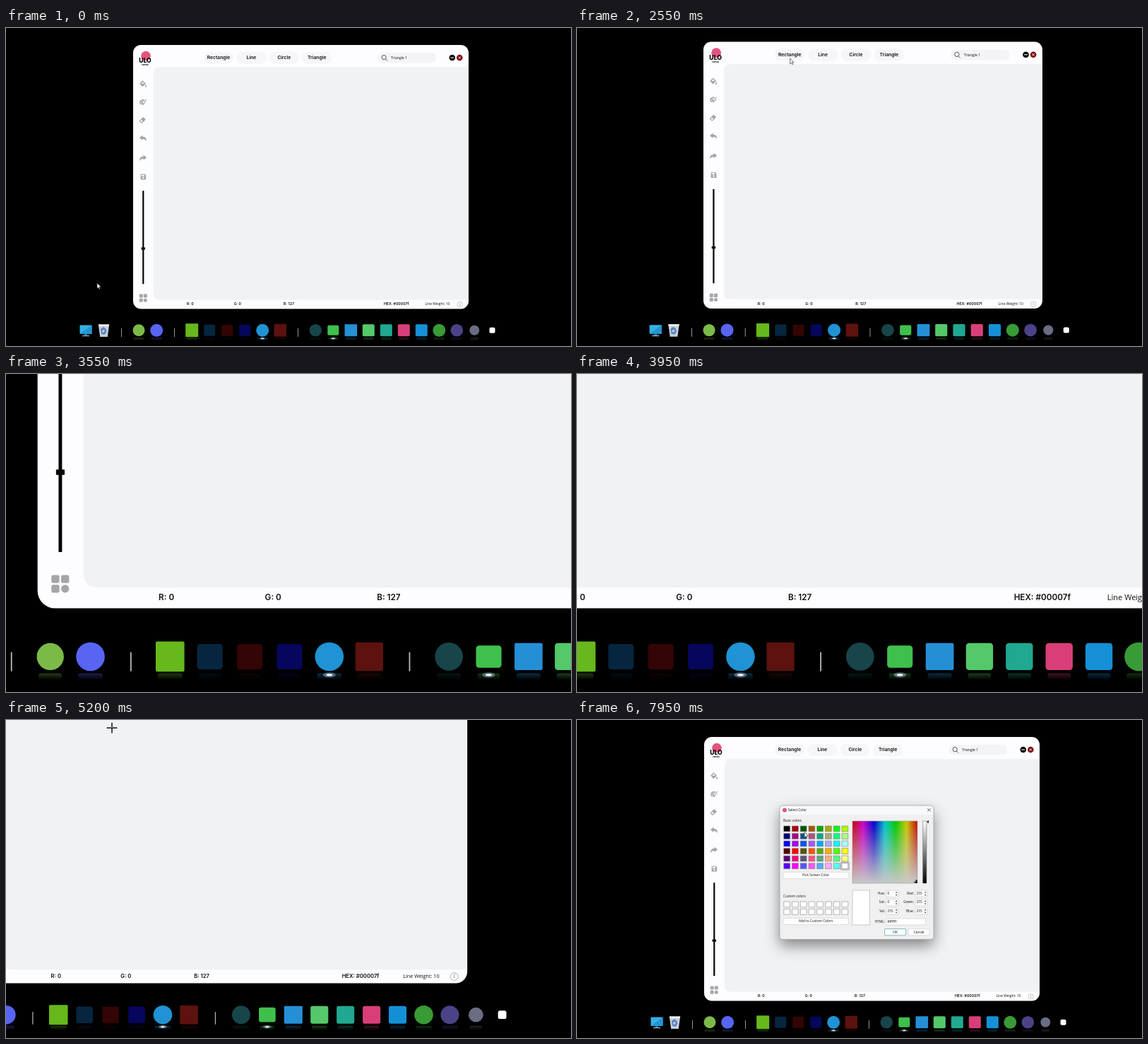
An HTML page with a canvas that plays this animation: 800x450 px, repeating every 8000 ms.

```html
<!DOCTYPE html>
<html lang="en">
<head>
<meta charset="utf-8">
<title>Paint app</title>
<style>
html, body { margin: 0; width: 100%; height: 100%; overflow: hidden; background: #000; }
canvas { display: block; width: 100vw; height: 100vh; }
</style>
</head>
<body>
<canvas id="stage" width="800" height="450"></canvas>
<script>
const c = document.getElementById('stage').getContext('2d');
const UI = '"Open Sans", sans-serif', HEAD = 'Inter, sans-serif';
const LOOP = 8000, GREY = '#a4a5a8', INK = '#111';

const ease = (t, a, b) => {
  const f = Math.min(1, Math.max(0, (t - a) / (b - a)));
  return f * f * (3 - 2 * f);
};

function box(x, y, w, h, r, fill, stroke) {
  c.beginPath();
  c.roundRect(x, y, w, h, r);
  if (fill) { c.fillStyle = fill; c.fill(); }
  if (stroke) { c.strokeStyle = stroke; c.lineWidth = 0.6; c.stroke(); }
}
function disc(x, y, r, fill) {
  c.beginPath();
  c.arc(x, y, r, 0, 7);
  c.fillStyle = fill;
  c.fill();
}
function shape(d, fill, x = 0, y = 0) {
  c.save();
  c.translate(x, y);
  c.fillStyle = fill;
  c.fill(new Path2D(d), 'evenodd');
  c.restore();
}
function lines(d, color, width) {
  c.strokeStyle = color;
  c.lineWidth = width;
  c.stroke(new Path2D(d));
}
function text(s, x, y, size, align = 'left', font = UI, weight = 400, color = INK) {
  c.font = `${weight} ${size}px ${font}`;
  c.textAlign = align;
  c.textBaseline = 'middle';
  c.fillStyle = color;
  c.fillText(s, x, y);
}
function gradient(x0, y0, x1, y1, colors) {
  const g = c.createLinearGradient(x0, y0, x1, y1);
  colors.forEach((k, i) => g.addColorStop(i / (colors.length - 1), k));
  return g;
}

// Pointer stops: time, x, y
const STOPS = [
  [0, 129, 361], [50, 129, 361], [700, 194, 105], [850, 194, 105], [1120, 298, 165],
  [1220, 298, 165], [1600, 450, 301], [1790, 450, 301], [2350, 301, 44], [2500, 301, 44],
  [3000, 314.5, 153], [5200, 314.5, 153], [5700, 300, 134], [5830, 300, 134],
  [6300, 418, 268], [6500, 418, 268], [7350, 194, 79], [7600, 194, 79], [7970, 323, 159], [8000, 323, 159]
];
const DRAG = [5830, 6300];

function pointerAt(t) {
  const i = STOPS.findIndex(s => s[0] > t);
  const [a, ax, ay] = STOPS[i - 1], [b, bx, by] = STOPS[i];
  const f = ease(t, a, b);
  return [ax + (bx - ax) * f, ay + (by - ay) * f];
}

// Dock icons: x, half width, half height (0 = circle), colour
const DOCK = [
  [188, 8.5, 0, '#7cba48'], [213.2, 9, 0, '#5865f2'], [263.2, 9, 9.5, '#66b81c'],
  [288.2, 8, 8, '#06263f'], [313.2, 8, 8, '#330504'], [338.2, 8, 8, '#06065c'],
  [363.2, 9, 0, '#1f93d4'], [388.3, 8.7, 9, '#5c120e'], [438.3, 8.8, 0, '#17454a'],
  [463.3, 8, 7, '#3fc04c'], [488.3, 8.8, 8.5, '#258fd6'], [513.3, 8.5, 8.5, '#55c86a'],
  [538.3, 8.5, 8.5, '#20a890'], [563.3, 8.5, 8.5, '#d83f78'], [588.3, 8.5, 8.5, '#1590d6'],
  [613.3, 9, 0, '#389b35'], [638.3, 8.8, 0, '#4b4388'], [663.3, 7, 0, '#6a6d84'], [688.5, 4, 4, '#fff']
];

function drawDock() {
  for (const x of [163.6, 238.6, 413.6]) box(x - 0.4, 425, 0.8, 12, 0, '#bbb');

  box(104.5, 420.5, 17, 12.5, 1, '#38b0e4');
  shape('M104.5 433 L121.5 420.5 V433Z', '#2196d3');
  box(111, 433, 4, 2.5, 0, '#27699a');
  box(108, 435, 10, 1.3, 0.5, '#8fb8d4');

  shape('M130.8 419.5 H146.2 L143.8 437 H133.2Z', '#c8d0da');
  shape('M130.8 419.5 H146.2 L145.6 422 H131.5Z', '#eef1f4');
  shape('M134 426 l4 -3 l3.5 3 l1 4 l-3 4 l-4.5 -1Z M137 427 l3 1 l-1.5 3 l-2.5 -1Z', '#5d83c4');

  for (const [x, w, h, color] of DOCK) {
    const y = 427.8;
    if (h) box(x - w, y - h, w * 2, h * 2, w > 8.5 ? 1 : 2, color);
    else disc(x, y, w, color);
    if (w < 7) continue;
    c.globalAlpha = 0.3;
    box(x - w * 0.85, 438.3, w * 1.7, 4.2, 1, gradient(0, 438.3, 0, 442.5, [color, '#000']));
    c.globalAlpha = 1;
  }
  for (const x of [363.2, 463.3]) {
    c.fillStyle = 'rgba(190,215,255,.4)';
    c.beginPath(); c.ellipse(x, 439.3, 4, 1.6, 0, 0, 7); c.fill();
    c.fillStyle = '#fff';
    c.beginPath(); c.ellipse(x, 439.3, 2, 0.7, 0, 0, 7); c.fill();
  }
}

function drawTools(hover) {
  const tint = y => hover === y ? '#4a4a4a' : GREY;
  shape('M-4.8 -.5 L-.5 -4.7 L4 -.2 L-.8 4.2Z M-2.8 -.2 H2 L-.5 -2.8Z M3.8 1 q2.2 3.5 0 3.7 q-2 -.2 0 -3.7Z', tint(79), 194, 79);
  shape('M-4.8 .5 C-4.8 -3 -1 -4.8 2.2 -3.6 L-.3 -.6 L0 1.4 L2.4 .7 L4 -1.5 C4.8 1 2 1.2 1.8 2.2 C1.7 4.5 -4.8 4.8 -4.8 .5Z M-3.4 0 h1.3 v1.3 h-1.3Z M-1.8 -2.3 h1.3 v1.3 h-1.3Z M-2.2 2 h1.3 v1.3 h-1.3Z M1 -.4 L4.3 -4.4 L5 -3.8 L2 .1Z', tint(105), 194, 105);
  shape('M-4.7 1.2 L1 -4.4 L4.6 -.8 L-.3 4.2 H-2.2Z M-3.1 1.3 L-1.5 2.9 H-.7 L.6 1.6 L-1.5 -.4Z', tint(130), 193.3, 130.3);
  const arrow = 'M-5 -.8 L-.6 -4.5 V-2.2 C3.6 -2 5 .3 5 4.2 C3.7 2 2.2 1.2 -.6 1.1 V3Z';
  shape(arrow, GREY, 194, 156);
  c.save();
  c.translate(194, 184);
  c.scale(-1, 1);
  shape(arrow, GREY);
  c.restore();
  shape('M-3.8 -3.8 H2.4 L3.8 -2.4 V3.8 H-3.8Z M-2.6 -2.8 V-.8 H1.6 V-2.8Z M-1.3 1.4 a1.3 1.3 0 1 0 2.6 0 a1.3 1.3 0 1 0 -2.6 0Z', GREY, 194.4, 210.6);

  box(193.2, 230.2, 2.2, 132, 0.4, '#050505');
  box(191.6, 310.4, 5.4, 3.3, 0.4, '#050505');
  for (const [x, y] of [[188.7, 376.6], [194.8, 376.6], [188.7, 382.7]]) box(x, y, 5, 5, 1, GREY);
  disc(197.3, 385.2, 2.5, GREY);
}

function drawApp(hover) {
  box(180, 24, 475, 373.5, 11, '#fdfcfe');
  box(209, 55.3, 446, 329.2, [8, 0, 0, 8], '#f1f2f4');

  disc(198, 39.5, 6.8, '#e2557e');
  text('ULO', 197, 46.4, 8.6, 'center', HEAD, 800, '#000');
  text('canvas', 197, 52, 2.8, 'center', HEAD, 700, '#000');

  ['Rectangle', 'Line', 'Circle', 'Triangle'].forEach((name, i) => {
    const x = 301 + i * 46.4;
    box(x - 20.7, 33.7, 41.4, 17, 8, '#f6f5f7');
    text(name, x, 42.2, 6.7, 'center', HEAD, 600);
  });
  box(526.5, 35, 82.5, 14.5, 7, '#f4f3f5');
  lines('M538.3 41.6 a3.1 3.1 0 1 1 -6.2 0 a3.1 3.1 0 1 1 6.2 0 M537.4 44 l2.4 2.5', '#333', 0.8);
  text('Triangle 1', 545, 42.8, 5.1);

  disc(631.8, 42, 4.3, '#000');
  lines('M629.3 42 h5', '#fff', 1.1);
  disc(642.3, 42, 4.3, '#7c0c10');
  lines('M640.7 40.4 l3.2 3.2 m0 -3.2 l-3.2 3.2', '#fff', 0.9);

  drawTools(hover);

  const status = (s, x) => text(s, x, 390.9, 5.2, 'center', HEAD, 600);
  status('R: 0', 260.9);
  status('G: 0', 327.9);
  status('B: 127', 400.5);
  status('HEX: #00007f', 552.7);
  text('Line Weight: 10', 593.5, 391.1, 4.9);
  lines('M646.3 391.2 a3.7 3.7 0 1 1 -7.4 0 a3.7 3.7 0 1 1 7.4 0', '#999', 0.5);
  text('i', 642.6, 391.2, 5.5, 'center', '"Noto Serif", serif', 'italic 400', '#888');
}

function field(label, value, right, y) {
  text(label, right, y, 4.75, 'right');
  box(right + 2, y - 4.6, 17, 9.2, 1, '#fff', '#c6c6c6');
  text(value, right + 3.5, y, 4.75);
  shape('M-1.3 -1.2 L0 -3 L1.3 -1.2Z M-1.3 1.2 L0 3 L1.3 1.2Z', '#333', right + 16.2, y);
}
function button(label, x, y, w, border = '#cfcfcf') {
  box(x, y, w, 9.2, 1.2, '#fdfdfd', border);
  text(label, x + w / 2, y + 4.7, 4.75, 'center');
}

function drawDialog(navy) {
  c.save();
  c.shadowColor = 'rgba(0,0,0,.45)';
  c.shadowBlur = 20;
  c.shadowOffsetY = 9;
  box(287, 121, 218, 189.5, 4, '#f0f0f0');
  c.restore();
  box(287, 121, 218, 13, [4, 4, 0, 0], '#f8f8fa');
  box(287, 121, 218, 189.5, 4, null, '#8f8f8f');
  disc(294, 127.6, 3, '#e2557e');
  text('Select Color', 299, 127.8, 4.75);
  lines('M496.3 125.2 l4.2 4.2 m0 -4.2 l-4.2 4.2', '#222', 0.7);

  text('Basic colors', 292, 143, 4.75);
  const picked = navy ? 1 : 47;
  for (let i = 0; i < 48; i++) {
    const col = Math.floor(i / 6), row = i % 6;
    const x = 292.8 + col * 11.74, y = 150 + row * 10.55;
    const rgb = [(col % 2 * 2 + Math.floor(row / 3)) * 85, Math.floor(col / 2) * 85, row % 3 * 127.5];
    box(x, y, 8.8, 7.8, 0, `rgb(${rgb.map(Math.floor)})`, '#777');
    if (i === picked) box(x - 1.4, y - 1.4, 11.6, 10.6, 0, null, '#666');
  }
  button('Pick Screen Color', 292, 215.3, 92.3);
  text('Custom colors', 292, 250.2, 4.75);
  for (let i = 0; i < 16; i++)
    box(292.8 + i % 8 * 11.74, 257 + Math.floor(i / 8) * 10.5, 8.8, 7.8, 0, '#fff', '#888');
  button('Add to Custom Colors', 292, 280.4, 92.3);

  const hues = ['#c80000', '#c800c8', '#0000c8', '#00c8c8', '#00c800', '#c8c800', '#c80000'];
  box(390, 143, 92, 88, 0, gradient(390, 0, 482, 0, hues));
  box(390, 143, 92, 88, 0, gradient(0, 143, 0, 231, ['rgba(200,200,200,0)', 'rgba(200,200,200,1)']), '#999');
  if (!navy) lines('M477.5 229.5 h4.5 M480.5 226 v5', '#000', 1.6);
  box(489.6, 143, 5.4, 88, 0, gradient(0, 143, 0, 231, [navy ? '#00f' : '#fff', '#000']), '#777');
  shape('M0 0 L2.4 -2.2 V2.2Z', '#000', 495.4, navy ? 187 : 144);
  box(390, 241, 24.5, 49, 0, navy ? '#00007f' : '#fff', '#aaa');

  const values = navy ? [240, 255, 127, 0, 0, 127] : [0, 0, 255, 255, 255, 255];
  ['Hue:', 'Sat:', 'Val:', 'Red:', 'Green:', 'Blue:'].forEach((label, i) =>
    field(label, values[i], i < 3 ? 436 : 477, 245.8 + i % 3 * 12.4));
  text('HTML:', 436, 285.5, 4.75, 'right');
  box(438, 281, 55.5, 9, 1, '#fff', '#c6c6c6');
  text(navy ? '#00007f' : '#ffffff', 439.5, 285.5, 4.75);
  button('OK', 435.5, 295.6, 30.3, '#2f8f98');
  button('Cancel', 469.3, 295.6, 29.8);
}

function drawPointer(x, y, cross) {
  c.save();
  c.translate(x, y);
  if (cross) {
    c.globalCompositeOperation = 'difference';
    c.fillStyle = '#fff';
    c.fillRect(-5, -0.5, 10, 1);
    c.fillRect(-0.5, -5, 1, 4.5);
    c.fillRect(-0.5, 0.5, 1, 4.5);
  } else {
    const d = 'M0 0 V7.6 L1.8 6 L3 8.6 L4.2 8 L3.1 5.5 H5.5Z';
    shape(d, '#fff');
    lines(d, '#222', 0.6);
  }
  c.restore();
}

function draw(t) {
  // Camera: zoom in, pan right, zoom out, always resting on the bottom edge
  const zoom = 1.255 * (ease(t, 2500, 3452) - ease(t, 4638, 5608));
  const pan = 277.3 + 381.7 * ease(t, 3452, 4450);
  const s = 1 + zoom;
  c.setTransform(1, 0, 0, 1, 0, 0);
  c.fillStyle = '#000';
  c.fillRect(0, 0, 800, 450);
  c.setTransform(s, 0, 0, s, -pan * zoom, -450 * zoom);

  const [x, y] = pointerAt(t);
  const dialog = t >= 840 && t < 1790 || t >= 7650;
  const overTools = !dialog && Math.abs(x - 194) < 5;
  const hover = overTools && [79, 105].find(k => Math.abs(y - k) < 5);

  drawDock();
  drawApp(hover);
  if (t > DRAG[0]) {
    const [ex, ey] = pointerAt(Math.min(t, DRAG[1]));
    box(297.6, 131.7, ex - 295.2, ey - 129.4, 2.4, '#00007f');
  }
  if (dialog) drawDialog(t > 1150 && t < 1790);
  const onCanvas = x > 209 && y > 55 && y < 384;
  drawPointer(x, y, t > 2350 && onCanvas && !dialog);
}

function tick() {
  draw(performance.now() % LOOP);
  requestAnimationFrame(tick);
}
tick();
</script>
</body>
</html>
```
